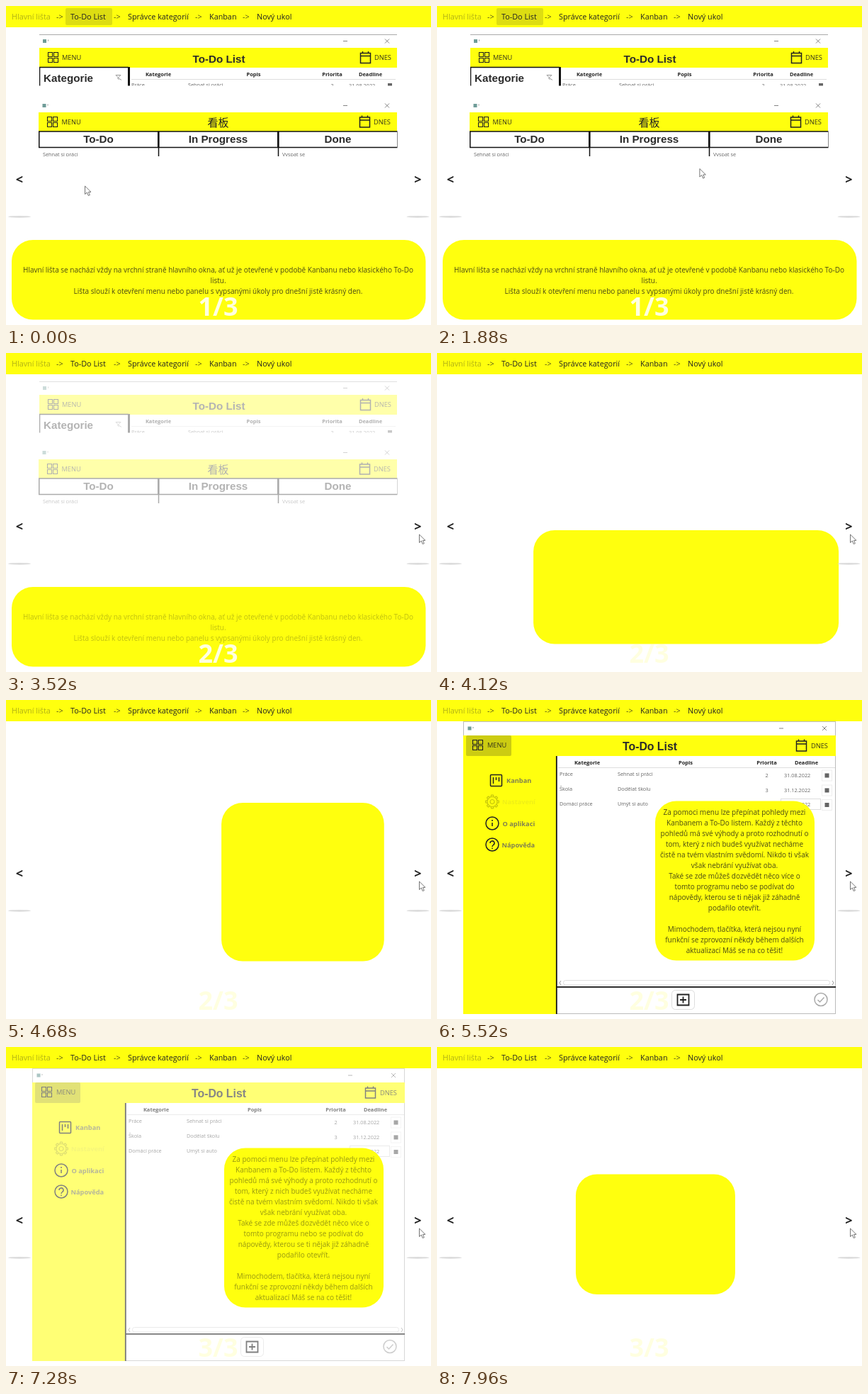
These frames come from a looping animation (600x450 px, 8 s). An HTML page:

```html
<!DOCTYPE html>
<html lang="cs">
<head>
<meta charset="utf-8">
<title>Nápověda</title>
<style>
  html, body { margin: 0; width: 100%; height: 100%; overflow: hidden; background: #fff; }
  svg { display: block; width: 600px; height: 450px; }
  text { font-family: "Open Sans", "Noto Sans", sans-serif; fill: #222; white-space: pre; }
  .nav { font-size: 10.8px; }
  .sep { font-size: 10.8px; fill: #55551a; }
  .body { font-size: 10px; fill: #4a4a14; }
  .tool { font-size: 9.25px; fill: #33331a; }
  .item { font-size: 9.25px; font-weight: 700; fill: #808050; }
  .th { font-size: 7.5px; font-weight: 700; }
  .td { font-size: 7.3px; fill: #666; }
  .head { font-family: "Liberation Sans", Arial, sans-serif; font-weight: 700; font-size: 15.2px; fill: #2b2b2b; }
  .big { font-size: 15.8px; }
  .cjk { font-family: "Noto Sans CJK SC", "Noto Sans CJK JP", "Noto Sans CJK", sans-serif; font-size: 15px; }
  .count { font-size: 36px; font-weight: 700; fill: #ffffe0; }
  .arrow { font-size: 18px; font-weight: 700; }
  .icon { fill: none; stroke: #222; stroke-width: 1.5; }
  .thin { stroke-width: 1.1; }
  .bold { stroke-width: 1.8; }
</style>
</head>
<body>
<svg id="stage" viewBox="0 0 600 450"></svg>
<script>
const YELLOW = '#ffff0e';
const LOOP = 8000;

// Drawing helpers
const rect = (x, y, w, h, fill, more = '') =>
  `<rect x="${x}" y="${y}" width="${w}" height="${h}" fill="${fill}" ${more}/>`;
const frame = (x, y, w, h, color, width = 1, rx = 0) =>
  rect(x, y, w, h, 'none', `stroke="${color}" stroke-width="${width}" rx="${rx}"`);
const path = (d, color, width = 1) =>
  `<path d="${d}" fill="none" stroke="${color}" stroke-width="${width}"/>`;
const text = (x, y, cls, str, anchor = 'start') =>
  `<text x="${x}" y="${y}" class="${cls}" text-anchor="${anchor}">${str.replace(/</g, '&lt;').replace(/>/g, '&gt;')}</text>`;
const mid = (x, y, cls, str) => text(x, y, cls, str, 'middle');
const paragraph = (x, y, lines) => lines.map((s, i) => mid(x, y + i * 15, 'body', s)).join('');

const gridIcon = (x, y) =>
  `<path class="icon thin" d="M${x} ${y}h6v6h-6zM${x + 8} ${y}h6v6h-6zM${x} ${y + 8}h6v6h-6zM${x + 8} ${y + 8}h6v6h-6z"/>`;
const calendarIcon = (x, y) =>
  `<path class="icon" d="M${x} ${y + 2}h14v14h-14zM${x} ${y + 6}h14M${x + 3} ${y - .5}v2.5M${x + 11} ${y - .5}v2.5"/>`;
const rowIcon = (x, y) => path(`M${x - 3} ${y - 2}h6m-6 2h6m-6 2h6`, '#333', 1.4);
const titleBar = (icon, min, close, y) =>
  rect(icon - 2.5, y - 2.5, 5, 5, '#6f9c98') +
  path(`M${icon + 5} ${y - 2}v2`, '#999') +
  path(`M${min - 3} ${y}h6M${close - 3} ${y - 3}l6 6m0 -6l-6 6`, '#777', .9);

function topWindow() {
  return `<g clip-path="url(#cutTop)">` +
    rect(47, 40, 505, 73, '#fff') + path('M47 40.5H552', '#aaa') +
    titleBar(54.5, 479, 538, 49.5) +
    rect(47, 59, 505, 28, YELLOW) +
    gridIcon(59.5, 65.5) + text(79, 76, 'tool', 'MENU') +
    mid(300.5, 79.5, 'head', 'To-Do List') +
    calendarIcon(500.5, 64.5) + text(520, 76, 'tool', 'DNES') +
    rect(47, 86, 126, 27, '#fff') + path('M47.5 113V86.5H173', '#111', 1.5) +
    path('M173.5 86V113', '#111', 3) +
    text(53, 107, 'head', 'Kategorie') +
    path('M155 97.5h7l-3 3v3l-1 -1v-2zM160 102.5l3 2', '#999') +
    mid(215, 98.5, 'th', 'Kategorie') + mid(349.5, 98.5, 'th', 'Popis') +
    mid(460.5, 98.5, 'th', 'Priorita') + mid(514.5, 98.5, 'th', 'Deadline') +
    path('M177 103.5H550', '#ddd') +
    text(177, 114, 'td', 'Práce') + text(257, 114, 'td', 'Sehnat si práci') +
    mid(460.5, 115, 'td', '2') + text(484, 115, 'td', '31.08.2022') +
    rowIcon(542, 112) + '</g>';
}

function boardWindow() {
  const columns = [[46.5, 'To-Do'], [215.5, 'In Progress'], [384.5, 'Done']];
  return `<g clip-path="url(#cutBoard)">` +
    rect(46, 131, 506, 81, '#fff') +
    titleBar(54, 479, 538, 140.5) +
    rect(46, 150, 506, 27, YELLOW) +
    gridIcon(58.5, 156.5) + text(78.5, 166.5, 'tool', 'MENU') +
    mid(299.5, 170, 'cjk', '看板') +
    calendarIcon(499.5, 155) + text(519, 166.5, 'tool', 'DNES') +
    columns.map(([x, name]) =>
      frame(x + .25, 177, 168, 22.5, '#111', 1.5) + mid(x + 84, 193, 'head', name)).join('') +
    path('M215.5 177V212M384.5 177V212', '#111', 1.5) +
    text(52, 211.5, 'td', 'Sehnat si práci') + text(390, 211.5, 'td', 'Vyspat se') + '</g>';
}

function gear(x, y) {
  const teeth = Array.from({ length: 8 }, (_, i) =>
    `<path d="M-2 -7L-1.3 -9.3H1.3L2 -7" transform="rotate(${i * 45})"/>`).join('');
  return `<g transform="translate(${x} ${y})" fill="none" stroke="#c6c60c" stroke-width="1.2">
    <circle r="7"/><circle r="3"/>${teeth}</g>`;
}

function sidePanel() {
  return rect(37, 79, 132, 364, YELLOW) +
    `<g class="icon"><rect x="75.5" y="105.5" width="16" height="16" rx="1"/>
      <path d="M79.5 109v9M83.5 109v4M87.5 109v6"/>
      <circle cx="78" cy="174" r="9"/><path d="M78 173v5M78 169v2"/>
      <circle cx="78" cy="204" r="9"/>
      <path d="M75 202a3 3 0 1 1 4.5 2.5q-1.5 1 -1.5 2.5M78 208.5v1.5"/></g>` +
    gear(78, 143.5) +
    text(98, 117, 'item', 'Kanban') +
    `<g opacity=".12">${text(92, 147, 'item', 'Nastavení')}</g>` +
    text(92.5, 177.5, 'item', 'O aplikaci') + text(91.5, 207.5, 'item', 'Nápověda');
}

function taskTable() {
  const rows = [
    [107, 'Práce', 'Sehnat si práci', '2', '31.08.2022'],
    [128, 'Škola', 'Dodělat školu', '3', '31.12.2022'],
    [148.5, 'Domácí práce', 'Umýt si auto', '1', '30.09.2022']
  ];
  const heads = [[212, 'Kategorie'], [351, 'Popis'], [465.5, 'Priorita'], [521.5, 'Deadline']];
  return heads.map(([x, s]) => mid(x, 91, 'th', s)).join('') +
    path('M171 95.5H562', '#ddd') +
    rows.map(([y, kind, what, rank, due]) =>
      text(173, y, 'td', kind) + text(255, y, 'td', what) +
      mid(465.5, y + 1.5, 'td', rank) + text(490, y + 1.5, 'td', due) +
      rowIcon(550.5, y - .5) + frame(543.5, y - 8, 14, 15, '#eee')).join('') +
    frame(485.5, 139.5, 56, 15, '#ddd') +
    frame(178.5, 395.5, 376, 6.5, '#ddd', 1, 3) +
    path('M175 396l-2 3l2 3M558 396l2 3l-2 3', '#999');
}

function menuWindow() {
  return rect(37, 30, 526, 413, '#fff') +
    frame(37.5, 30.5, 525, 412, '#bbb') +
    titleBar(46, 486, 547, 40) +
    rect(37, 50, 526, 29, YELLOW) +
    rect(41, 50, 64, 29, '#cccc12', 'rx="2"') +
    gridIcon(50.5, 56.5) + text(71, 67, 'tool', 'MENU') +
    mid(300.5, 70.5, 'head big', 'To-Do List') +
    calendarIcon(507.5, 56) + text(528, 67.5, 'tool', 'DNES') +
    sidePanel() + taskTable() +
    path('M168.8 79V443M168 404.8H563', '#111', 1.8) +
    frame(331.5, 409.5, 32, 27, '#ddd', 1, 5) +
    `<path class="icon bold" d="M339.5 415.5h16v15h-16zM347.5 418.5v9M343 423h9"/>` +
    `<circle cx="542" cy="422.5" r="9" fill="none" stroke="#aaa" stroke-width="1.5"/>` +
    path('M537.5 423l3 3l6 -6.5', '#aaa', 1.5);
}

const barNote = paragraph(299.5, 375.5, [
  'Hlavní lišta se nachází vždy na vrchní straně hlavního okna, ať už je otevřené v podobě Kanbanu nebo klasického To-Do',
  'listu.',
  'Lišta slouží k otevření menu nebo panelu s vypsanými úkoly pro dnešní jistě krásný den.'
]);
const menuNote = paragraph(420, 161.5, [
  'Za pomoci menu lze přepínat pohledy mezi',
  'Kanbanem a To-Do listem. Každý z těchto',
  'pohledů má své výhody a proto rozhodnutí o',
  'tom, který z nich budeš využívat necháme',
  'čistě na tvém vlastním svědomí. Nikdo ti však',
  'však nebrání využívat oba.',
  'Také se zde můžeš dozvědět něco více o',
  'tomto programu nebo se podívat do',
  'nápovědy, kterou se ti nějak již záhadně',
  'podařilo otevřít.',
  '',
  'Mimochodem, tlačítka, která nejsou nyní',
  'funkční se zprovozní někdy během dalších',
  'aktualizací Máš se na co těšit!'
]);

const crumbs = [[91, 'To-Do List'], [172, 'Správce kategorií'], [287, 'Kanban'], [354, 'Nový ukol']];
const navBar = rect(0, 0, 600, 30, YELLOW) +
  rect(84, 3, 66, 24, '#dddd12', 'rx="2" id="tab"') +
  `<g opacity=".35">${text(8, 19, 'nav', 'Hlavní lišta')}</g>` +
  crumbs.map(([x, s]) => text(x, 19, 'nav', s)).join('') +
  [71, 152, 267, 334].map(x => text(x, 19, 'sep', '->')).join('');

const shadow = x => `<ellipse cx="${x}" cy="297.3" rx="16" ry="1.4" fill="#dcdcdc"/>`;

document.getElementById('stage').innerHTML = `
  <defs>
    <clipPath id="cutTop"><path d="M47 40H552V112.5H47z"/></clipPath>
    <clipPath id="cutBoard"><path d="M46 131H552.5V212H46z"/></clipPath>
    <linearGradient id="fall" x2="0" y2="1">
      <stop stop-color="#c8c8c8"/><stop offset="1" stop-color="#fff"/>
    </linearGradient>
  </defs>
  <g id="bars">${topWindow()}${boardWindow()}</g>
  <g id="menu">${menuWindow()}</g>
  <rect id="box" rx="30" fill="${YELLOW}"/>
  <g id="barNote">${barNote}</g>
  <g id="menuNote">${menuNote}</g>
  <text id="count" class="count" x="299.5" y="437" text-anchor="middle"></text>
  ${navBar}
  ${shadow(19)}${shadow(581.5)}
  <g id="hover">
    ${rect(566, 296, 34, 9, 'url(#fall)', 'rx="4"')}
    ${rect(563, 191.5, 37, 105, '#c6c6c6', 'rx="3"')}
  </g>
  ${mid(19, 251, 'arrow', '<')}${mid(581.5, 251, 'arrow', '>')}
  <path id="cursor" d="M0 0V11.5L2.8 9L4.8 13.5L6.8 12.6L4.9 8.4H8.5Z" fill="#fff" stroke="#666" stroke-width=".9"/>`;

// Each track is a list of [time, value, ...], linear between entries
const tracks = {
  bars: [[3200, 1], [3694, 0]],
  menu: [[4740, 0], [5280, 1], [7065, 1], [7565, 0]],
  hover: [[2600, 0], [2760, 1], [3200, 1], [3200, 0], [6000, 0], [6160, 1], [7065, 1], [7065, 0]],
  tab: [[3200, 1], [3200, 0]],
  // left, top, right, bottom
  box: [[3694, 8, 330, 592.5, 442.5], [4694, 308, 142.5, 533, 367.5],
        [7565, 308, 142.5, 533, 367.5], [8565, 25, 236, 250, 321]],
  cursor: [[1000, 111.5, 254], [1880, 370.5, 229.5], [2440, 583.5, 256]]
};

function at(track, t) {
  const next = track.findIndex(k => k[0] > t);
  if (next === 0) return track[0].slice(1);
  if (next < 0) return track[track.length - 1].slice(1);
  const a = track[next - 1], b = track[next];
  const p = (t - a[0]) / (b[0] - a[0]);
  return a.slice(1).map((v, i) => v + (b[i + 1] - v) * p);
}

const parts = Object.fromEntries(
  ['bars', 'barNote', 'menu', 'menuNote', 'hover', 'tab', 'box', 'count', 'cursor']
    .map(id => [id, document.getElementById(id)]));

function draw(t) {
  const fade = (id, name = id) => parts[id].setAttribute('opacity', at(tracks[name], t)[0]);
  ['bars', 'menu', 'hover', 'tab'].forEach(id => fade(id));
  fade('barNote', 'bars');
  fade('menuNote', 'menu');
  const [left, top, right, bottom] = at(tracks.box, t);
  const place = { x: left, y: top, width: right - left, height: bottom - top };
  for (const key in place) parts.box.setAttribute(key, place[key]);
  parts.count.textContent = (t < 3200 ? 1 : t < 7065 ? 2 : 3) + '/3';
  parts.cursor.setAttribute('transform', `translate(${at(tracks.cursor, t).join(' ')})`);
}

const start = performance.now();
function tick() {
  draw((performance.now() - start) % LOOP);
  requestAnimationFrame(tick);
}
tick();
</script>
</body>
</html>
```
